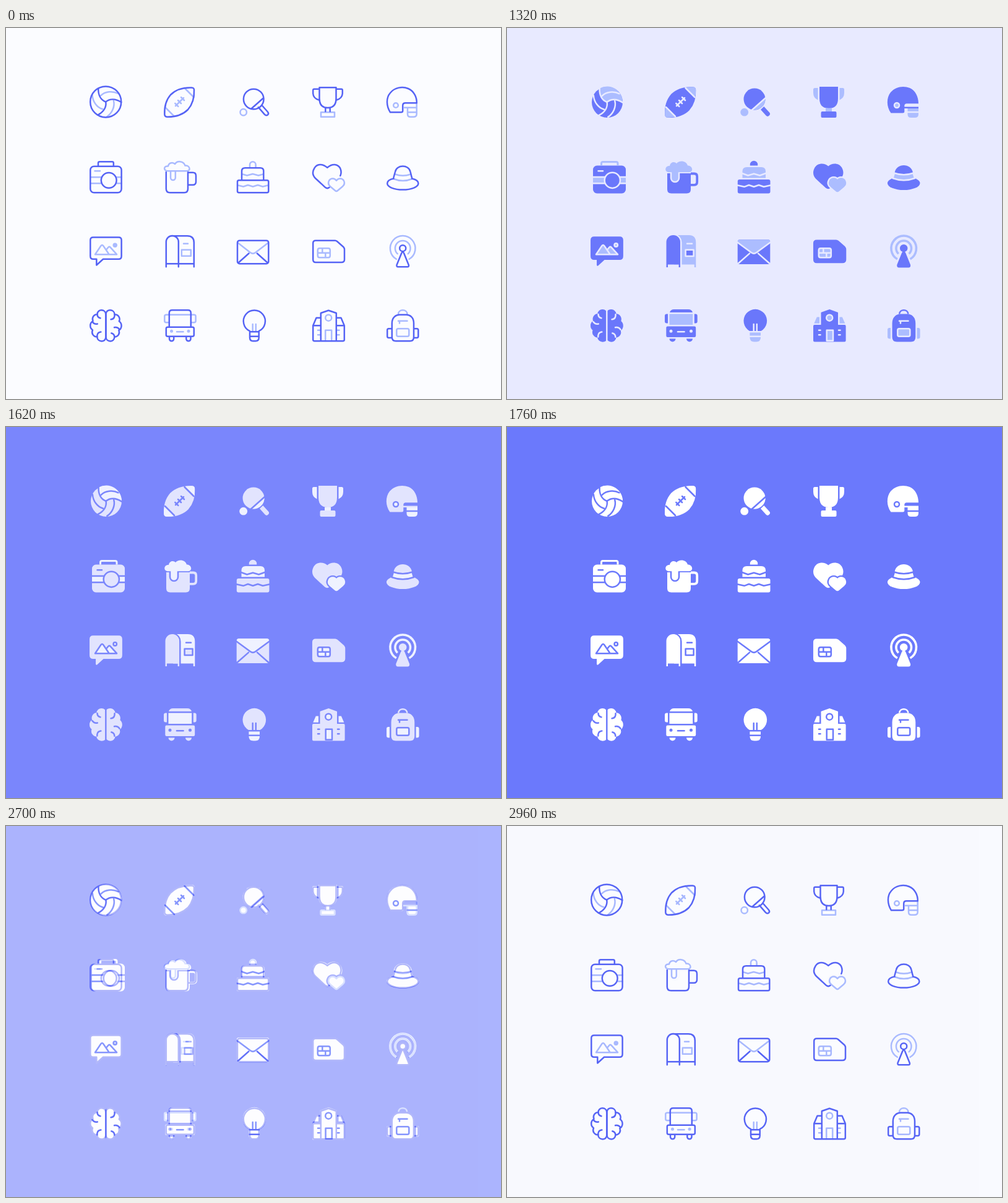
Recreate the animation shown at these times as an HTML page. Size 800x600 px, loop 3.6 s.

```html
<!DOCTYPE html>
<html lang="en">
<head>
<meta charset="utf-8">
<title>Icon styles</title>
<style>
html, body { margin: 0; width: 100%; height: 100%; overflow: hidden; }
svg { display: block; width: 100vw; height: 100vh; background: var(--g); }
#line { fill: none; stroke: #5563f5; stroke-width: 2.5; stroke-linecap: round; stroke-linejoin: round; }
#line .l { stroke: #a9baff; }
#line .dot { fill: #a9baff; stroke: none; }
#solid { fill: var(--d); stroke-width: 2.5; stroke-linejoin: round; }
#solid .l { fill: var(--l); }
#solid .g { fill: none; stroke: var(--g); stroke-linecap: round; }
#solid .lg { fill: var(--l); stroke: var(--g); }
#solid .dg { fill: var(--d); stroke: var(--g); }
#solid .ds { fill: none; stroke: var(--d); }
#solid .ls { fill: none; stroke: var(--l); }
</style>
</head>
<body>
<svg viewBox="0 0 800 600">
<defs>
  <path id="seam" d="M-12 -22C-12.5 -11 -8 -3 0 0"/>
  <path id="rib" d="M-8 -10C-1 -17 11 -18 20 -13.5"/>
  <g id="seams"><use href="#seam"/><use href="#seam" transform="rotate(120)"/><use href="#seam" transform="rotate(240)"/></g>
  <g id="ribs"><use href="#rib"/><use href="#rib" transform="rotate(120)"/><use href="#rib" transform="rotate(240)"/></g>
  <path id="football" d="M300 96.5C303 96.7 303.8 97.5 304 100C304.6 114 301 124 294 132C285 141 273 144 260 143.7C257.5 143.5 256.5 142.5 256.3 140C255.7 126 259 116 266 108C275 99 287 96 300 96.5Z"/>
  <path id="laces" d="M288.5 97L303.5 112M257 128L272 143M274 126L287 113M273.3 121.8l5 5M278 117l5 5M283 112l5 5"/>
  <path id="smallHeart" d="M534 246.8C531 242.5 525 242.5 522.3 246.5C520 250.5 521.5 254 524 256.2L532 263Q534 264.8 536 263L544 256.2C546.5 254 548 250.5 545.7 246.5C543 242.5 537 242.5 534 246.8Z"/>
  <path id="bubble" d="M141 338.5H182Q186.6 338.5 186.6 343V369Q186.6 373.8 182 373.8H157L146.3 383.5V373.8H141Q136.3 373.8 136.3 369V343Q136.3 338.5 141 338.5Z"/>
  <path id="peaks" d="M144 366.2L153.4 352.3Q155.3 349.8 157.2 352.3L161.8 359L165.2 354.8Q167 352.8 168.8 354.8L179 366.2ZM161.8 359L166.5 366"/>
  <path id="sim" d="M500.5 343.7H532Q533.5 343.7 535 345L545.5 354.3Q547 356 547 358V374.5Q547 379 542 379H500.5Q496.2 379 496.2 374.5V348Q496.2 343.7 500.5 343.7Z"/>
  <path id="chip" d="M506.8 356.2H520.8Q523.8 356.2 523.8 359.2V368.2Q523.8 371.2 520.8 371.2H506.8Q503.8 371.2 503.8 368.2V359.2Q503.8 356.2 506.8 356.2ZM504 363.8H523.5M511.3 356.5V363.8M516.3 363.8V371"/>
  <path id="tower" d="M639.3 364L631.5 383.3Q631 386.2 633.5 386.2H648.8Q651.5 386.2 650.8 383.3L643 364Q641.2 360.5 639.3 364Z"/>
  <path id="waves" d="M630.8 373.8A20.3 20.3 0 1 1 651.6 373.8M632.7 365.2A12.3 12.3 0 1 1 649.7 365.2"/>
  <path id="lobe" d="M161.3 463.5C161.3 454 147.5 454 147.5 463C141 463.5 138.5 469 140.5 474C135 477 134.8 485 140 488.5C137.5 493.5 141 499.5 147.3 499.5C147.5 508.5 161.3 509 161.3 500Z"/>
  <path id="folds" d="M147.5 463Q147.5 468 152.5 469.3M147.3 499.5V497.3Q148 492 153.3 491.5M139.3 475Q142.5 479.5 147.8 478.5"/>
  <path id="pack" d="M623.8 477.5C623.8 468 630 463.7 636 463.7H647C653 463.7 659 468 659 477.5V500Q659 506.2 653 506.2H630Q623.8 506.2 623.8 500Z"/>
</defs>

<g id="solid">
  <!-- sports -->
  <circle cx="162" cy="120" r="25"/>
  <g transform="translate(161.6 119.8)">
    <path class="l" d="M-12 -22C-12.5 -11 -8 -3 0 0C6.6 -5.4 15.8 -5.3 25.3 1A25 25 0 0 0 -12 -22Z"/>
    <use href="#seams" class="g"/><use href="#ribs" class="g"/>
  </g>
  <use href="#football" class="ds"/><use href="#football"/>
  <path class="l" d="M289 96L304.5 111.5Q305.3 105 305 99Q304.7 95.6 301 95.3Q296 95 289 96ZM256 128.5L271.5 144Q265 145 259 144.8Q255.5 144.5 255.2 141Q254.8 135 256 128.5Z"/>
  <use href="#laces" class="g"/>
  <circle cx="400" cy="115" r="17.5"/>
  <path class="l" d="M396.5 132L417.5 113.5A17.5 17.5 0 0 1 396.5 132Z"/>
  <path class="g" d="M396 132.5L418.5 112.5"/>
  <path d="M410 132L415.3 127L423.8 136.3A3.7 3.7 0 0 1 418.5 141.6Z"/>
  <circle class="l" cx="383.7" cy="136.2" r="6.4"/>
  <path d="M505 95H535V114Q535 130 520 130T505 114ZM509.5 135H530.5Q532.5 135 532.5 137V143Q532.5 145 530.5 145H509.5Q507.5 145 507.5 143V137Q507.5 135 509.5 135Z"/>
  <path class="l" d="M502.5 97V116.5Q495 113 495 105V99.5Q495 97 497.5 97ZM537.5 97V116.5Q545 113 545 105V99.5Q545 97 542.5 97ZM515 129.6H525V135H515Z"/>
  <path d="M620.5 137.5C613 127 613 113 620 104C628 94.5 641 93 651 97C660 101 665 111 665 122.3H646Q642.3 122.3 642.3 126V135Q642.3 137.5 639.5 137.5ZM642 127.5H665V130H642Z"/>
  <path class="l" d="M647.5 130H665V139.5Q665 145 659 145H653Q647.5 145 647.5 139.5Z"/>
  <path class="g" d="M648 136H666"/>
  <circle class="lg" cx="630" cy="125" r="4"/>

  <!-- leisure -->
  <rect x="139" y="222.5" width="53" height="45" rx="6.5"/>
  <path class="l" d="M139 241H192V251H139Z"/>
  <path class="g" d="M138 241H193M138 251.2H193M147.5 231.2H155"/>
  <circle class="dg" cx="170.3" cy="246.3" r="12.6"/>
  <path class="ls" stroke-width="3" d="M152.5 222.5V219Q152.5 216.5 155 216.5H176.5Q179 216.5 179 219V222.5"/>
  <path d="M259 235H297V261Q297 267.5 290.5 267.5H265.5Q259 267.5 259 261Z"/>
  <path class="ds" style="stroke-width:3.8" d="M297 235.5H302.5Q307.2 235.5 307.2 240V249Q307.2 253.8 302.5 253.8H297"/>
  <path class="lg" d="M265 232V242.5a6.5 6.5 0 0 0 13 0V232"/>
  <path class="l" d="M262 233.3C254 233.3 254.5 222.5 263 223C264 216.5 271 215.5 274 219C278 213.5 290 214 292 222.5C300.5 222.5 302 233.3 294 233.3Z"/>
  <path d="M392.8 222.6V221a6.2 6.2 0 0 1 12.4 0V222.6ZM375.8 245H422.5Q425.5 245 425.5 248V264.5Q425.5 267.5 422.5 267.5H375.8Q372.8 267.5 372.8 264.5V248Q372.8 245 375.8 245Z"/>
  <path class="l" d="M380.5 242.6V232Q380.5 225 387.5 225H411Q418 225 418 232V242.6Z"/>
  <path class="g" d="M379 234.8L389.5 238.5L399 235.8L408.5 238.5L419 234.8M372 254.3L383.5 256.8L391 254L399 256.8L407 254L415 256.8L426.5 254.3"/>
  <path d="M519.3 223.5C513 217.5 502 218 497.5 225.5C493.5 232.5 494.5 239 499 243.8L515 258.5Q519.3 262 523 258.5L539 243.8C544 239 545 232.5 541 225.5C536.5 218 525.5 217.5 519.3 223.5Z"/>
  <use href="#smallHeart" class="g" style="stroke-width:7"/><use href="#smallHeart" class="ls"/><use href="#smallHeart" class="l"/>
  <ellipse cx="641.2" cy="251" rx="26.3" ry="11"/>
  <path class="lg" d="M623.5 243L627 231H655.5L659 243Q641.2 249.5 623.5 243Z"/>
  <path d="M626.5 234C629 218 653.5 218 656 234Q641.2 239.5 626.5 234Z"/>
  <path class="g" d="M625.5 234.5Q641.2 240 657 234.5"/>

  <!-- messages -->
  <use href="#bubble" class="ds"/><use href="#bubble"/>
  <use href="#peaks" class="lg"/>
  <circle class="lg" cx="176.2" cy="351" r="2.7"/>
  <path class="l" d="M270 335H294Q305.3 335 305.3 347V387H302.8V382.5H270Z"/>
  <path class="g" d="M272 335Q281.3 337.5 281.3 347V383M291 348.8H299"/>
  <rect class="dg" x="288.6" y="358.8" width="13" height="10.2"/>
  <path d="M257.5 387V346.3A11.2 11.2 0 0 1 280 346.3V387H277.6V382.5H260V387Z"/>
  <rect x="372.7" y="342.3" width="52.6" height="39.8" rx="3.5"/>
  <path class="l" d="M372.7 346.5Q372.7 342.3 376.5 342.3H421.5Q425.3 342.3 425.3 346.5L403 363.5Q399 366 395 363.5Z"/>
  <path class="g" d="M371.5 346L395 363.3Q399 366 403 363.3L426.5 346M374 380.5L392 364.6M424 380.5L406 364.6"/>
  <use href="#sim" class="ds"/><use href="#sim"/>
  <use href="#chip" class="lg"/>
  <use href="#waves" class="ls" style="stroke-width:3.6"/>
  <use href="#tower" class="g" style="stroke-width:6"/>
  <use href="#tower" class="ds"/><use href="#tower"/>
  <circle cx="641.2" cy="356.2" r="6.2"/>

  <!-- school -->
  <g id="half"><use href="#lobe" class="ds"/><use href="#lobe"/><use href="#folds" class="g"/></g>
  <use href="#half" transform="rotate(180 161.4 481.4)"/>
  <path class="g" d="M161.3 454V509"/>
  <path d="M263 460Q264.5 455 270 455H293Q298.5 455 300 460ZM260 462.5V477.5H258Q255 477.5 255 474.5V465.5Q255 462.5 258 462.5ZM302.8 462.5V477.5H304.8Q307.7 477.5 307.7 474.5V465.5Q307.7 462.5 304.8 462.5ZM259.5 482.5H303Q305.2 482.5 305.2 484.7V497.8Q305.2 500 303 500H259.5Q257.3 500 257.3 497.8V484.7Q257.3 482.5 259.5 482.5ZM262.5 502.5h10a5 5 0 0 1-10 0ZM290 502.5h10a5 5 0 0 1-10 0Z"/>
  <path class="l" d="M262.5 462.5H300.2V480H262.5Z"/>
  <path class="g" d="M276 491.2H286.5"/>
  <path class="g" style="stroke-width:5" d="M265 490.2h.01M297.5 490.2h.01"/>
  <path d="M392 490A18.8 18.8 0 1 1 410.6 490Z"/>
  <path class="l" d="M392.4 492.4H410V500Q410 507.6 403 507.6H399.5Q392.4 507.6 392.4 500Z"/>
  <path class="g" d="M391 498.8H412M398.7 479V490M403.8 479V490"/>
  <path d="M507.5 481V460L521.3 455L535 460V481ZM497 480H545.5Q547.6 480 547.6 482V505.5Q547.6 507.5 545.5 507.5H497Q495 507.5 495 505.5V482Q495 480 497 480Z"/>
  <path class="l" d="M500.8 467.5H505V477.8H496.3ZM537.5 467.5H541.8L546.3 477.8H537.5Z"/>
  <circle class="lg" cx="521.2" cy="468.7" r="5"/>
  <path class="lg" d="M516.7 505.8V488.8H527V505.8Z"/>
  <path class="g" d="M504 488.8H506.5M504 496.2H506.5M536 488.8H538.5M536 496.2H538.5"/>
  <path class="ds" d="M634 462.5C635 454 647.5 454 648.5 462.5"/>
  <use href="#pack" class="ds"/><use href="#pack"/>
  <path class="l" d="M620 485V502.5H618Q615 502.5 615 499.5V488Q615 485 618 485ZM662.6 485V502.5H664.6Q667.6 502.5 667.6 499.5V488Q667.6 485 664.6 485Z"/>
  <path class="g" d="M634 473.8H648.5M636 474V477.5"/>
  <rect class="lg" x="631.3" y="486.2" width="20" height="12.5" rx="2.5"/>
</g>

<g id="line">
  <rect width="800" height="600" fill="#fbfcff" stroke="none"/>
  <!-- sports -->
  <g transform="translate(161.2 119.4)">
    <use href="#ribs" class="l"/><use href="#seams"/><circle r="25"/>
  </g>
  <use href="#laces" class="l"/><use href="#football"/>
  <circle class="l" cx="383.7" cy="136.3" r="5.2"/>
  <circle cx="400.2" cy="115" r="16.3"/>
  <path d="M396.5 130.5L416 113.3M407.8 128.2L418 139.8C422 143.5 426 139 422.8 135.5L413.6 125"/>
  <path class="l" d="M509 136.2H531V143.8H509Z"/>
  <path d="M506.5 96.3H533.5V114Q533.5 129 520 129T506.5 114ZM506 98.8H498Q496.2 98.8 496.2 101V106Q496.7 114 506 116.5M534 98.8H542Q543.8 98.8 543.8 101V106Q543.3 114 534 116.5M516.3 129.5V135M523.7 129.5V135"/>
  <path class="l" d="M644 128.7H663.7M649 128.7V139Q649 143.8 653.5 143.8H658.5Q663.7 143.8 663.7 139V122M649 136.2H663.7"/>
  <circle class="l" cx="630" cy="125" r="3.8"/>
  <path d="M621 136.3C614.5 126 614 113 621 105C628 96 641 94 650 98C659 102 664 111 663.8 121.3H645.5Q641.2 121.3 641.2 125.5V134Q641.2 136.3 638.5 136.3Z"/>

  <!-- leisure -->
  <path class="l" d="M143.5 231.2H152M137 241.2H154M137 251.2H154M178 241.2H186M178 251.2H186"/>
  <rect x="136.3" y="223.7" width="50.3" height="42.6" rx="6"/>
  <circle cx="166.2" cy="246.3" r="12.4"/>
  <path d="M149 223V218.5Q149 216.3 151.3 216.3H171.5Q173.8 216.3 173.8 218.5V223"/>
  <path d="M258.8 233V260Q258.8 266.2 265 266.2H288Q294 266.2 294 260V233M294.5 233.8H302Q307 233.8 307 239V248.5Q307 253.8 302 253.8H294.5"/>
  <path class="l" d="M261.5 231.3C254 231.3 254.5 222.5 262 223.5C263 217.5 270 216.5 273 220C277 214 287 215 289.5 222.5C297 221.5 299.5 231.3 292 231.3ZM266 232V242a3.9 3.9 0 0 0 7.8 0V232"/>
  <path class="l" d="M394 225V221a4.8 4.8 0 0 1 9.6 0V225M382.5 236.5L389.5 238.5L398.7 236L408 238.5L415.5 236.5M375.5 254.5L383.5 256.5L391 254L399 256.5L407 254L415 256.5L423 254.5"/>
  <path d="M381 245.5V231.5Q381 226.3 386.5 226.3H411Q416.3 226.3 416.3 231.5V245.5"/>
  <rect x="374" y="246.2" width="50.3" height="20" rx="2.5"/>
  <use href="#smallHeart" class="l"/>
  <path d="M522.5 257.8Q519.3 260.5 516 257.8L500 243C496 239 494.5 233 498.5 226.5C502 220 511 218.5 519.3 225.8C527.5 218.5 536 220 540 226.5Q543 233 540.3 239"/>
  <path class="l" d="M629 236.5Q641.2 241 654 236.5M626.5 244Q641.2 250 656.5 244"/>
  <path d="M626.5 243.5C619 245 616.2 248 616.2 251.3C616.2 257 627 261.6 641.2 261.6S666.4 257 666.4 251.3C666.4 248 663 245 656 243.5M626 243.5C627 240 628 236 629 232.5C631.5 220.5 651 220.5 653.5 232.5C654.5 236 655 240 656.5 243.5"/>

  <!-- messages -->
  <use href="#peaks" class="l"/><circle class="dot" cx="176.2" cy="351.2" r="3.7"/><use href="#bubble"/>
  <path class="l" d="M287 348.8H294M283.8 358.8H298.8V368.8H283.8Z"/>
  <path d="M258.8 386.2V346A10 10 0 0 1 278.8 346V386.2M268.8 336.2H293Q303.8 336.2 303.8 347V386.2M258.8 381.2H303.8"/>
  <path class="l" d="M375.5 348L395 363.3Q399 366 403 363.3L423 348"/>
  <rect x="374" y="343.7" width="50.3" height="37.5" rx="3.5"/>
  <path d="M376 379.3L392.5 364.5M422.3 379.3L405.8 364.5"/>
  <use href="#chip" class="l"/><use href="#sim"/>
  <use href="#waves" class="l"/><use href="#tower"/><circle cx="641.2" cy="356.2" r="5"/>

  <!-- school -->
  <g id="side"><use href="#lobe"/><use href="#folds"/></g>
  <use href="#side" transform="rotate(180 161.4 481.4)"/>
  <path class="l" d="M263 463.8H259Q256.3 463.8 256.3 466.3V473.7Q256.3 476.2 259 476.2H263M299.5 463.8H304Q306.6 463.8 306.6 466.3V473.7Q306.6 476.2 304 476.2H299.5M264 463.8H298M276 491.2H286.5"/>
  <circle class="dot" cx="267.5" cy="490.3" r="2.5"/><circle class="dot" cx="295" cy="490.3" r="2.5"/>
  <path d="M263.8 482.5V461Q263.8 456.3 268.5 456.3H294Q298.8 456.3 298.8 461V482.5M264 499.5V502.7a3.6 3.6 0 0 0 7.2 0V499.5M291.3 499.5V502.7a3.6 3.6 0 0 0 7.2 0V499.5"/>
  <rect x="258.8" y="483.8" width="45" height="15" rx="2.5"/>
  <path class="l" d="M398.7 479V490M403.8 479V490"/>
  <path d="M394 490.2A17.6 17.6 0 1 1 408.7 490.2V500.5Q408.7 506.2 403.5 506.2H399Q394 506.2 394 500.5ZM394 491.2H408.7M394 498.8H408.7"/>
  <circle class="l" cx="521.2" cy="468.7" r="5"/>
  <path class="l" d="M516.2 506V488.8H526.2V506M504 488.8H507.5M504 496.2H507.5M535 488.8H538.5M535 496.2H538.5"/>
  <path d="M508.8 506V461L521.2 456.8L533.8 461V506M508.8 468.8H501.5L496.2 481.2V504Q496.2 506.2 498.5 506.2H544.5Q546.8 506.2 546.8 504V481.2L541.5 468.8H533.8M496.2 481.2H508.8M533.8 481.2H546.8"/>
  <path class="l" d="M634 463C634 454 648.5 454 648.5 463M634 473.8H648.5M636 474V477.5"/>
  <rect class="l" x="631.3" y="486.2" width="20" height="12.5" rx="2.5"/>
  <use href="#pack"/>
  <path d="M623.5 486.2H618.5Q616.2 486.2 616.2 488.5V498.5Q616.2 501 618.5 501H623.5M659.5 486.2H664Q666.3 486.2 666.3 488.5V498.5Q666.3 501 664 501H659.5"/>
</g>
</svg>
<script>
const LOOP = 3600;
const svg = document.querySelector('svg');
const line = document.getElementById('line');
const white = [255, 255, 255];

const ramp = (t, from, to) => Math.min(1, Math.max(0, (t - from) / (to - from)));
const easeInOut = x => (1 - Math.cos(Math.PI * x)) / 2;
const easeOut = x => Math.sin(Math.PI / 2 * x);
const mix = (a, b, p) => `rgb(${a.map((v, i) => v + (b[i] - v) * p)})`;

function draw(now) {
  const t = now % LOOP;
  const invert = ramp(t, 1280, 1760);
  const tint = easeInOut(invert);
  svg.style.setProperty('--g', mix([251, 252, 255], [107, 121, 252], easeOut(invert)));
  svg.style.setProperty('--d', mix([103, 117, 251], white, tint));
  svg.style.setProperty('--l', mix([170, 188, 255], white, tint));
  line.style.opacity = t < 1280
    ? 1 - 0.95 * easeInOut(ramp(t, 100, 500))
    : t < 1760
      ? 0.05 * (1 - ramp(t, 1280, 1320))
      : 0.985 * easeInOut(ramp(t, 2470, 2960));
}

const start = performance.now();
function tick() {
  draw(performance.now() - start);
  requestAnimationFrame(tick);
}
tick();
</script>
</body>
</html>
```
